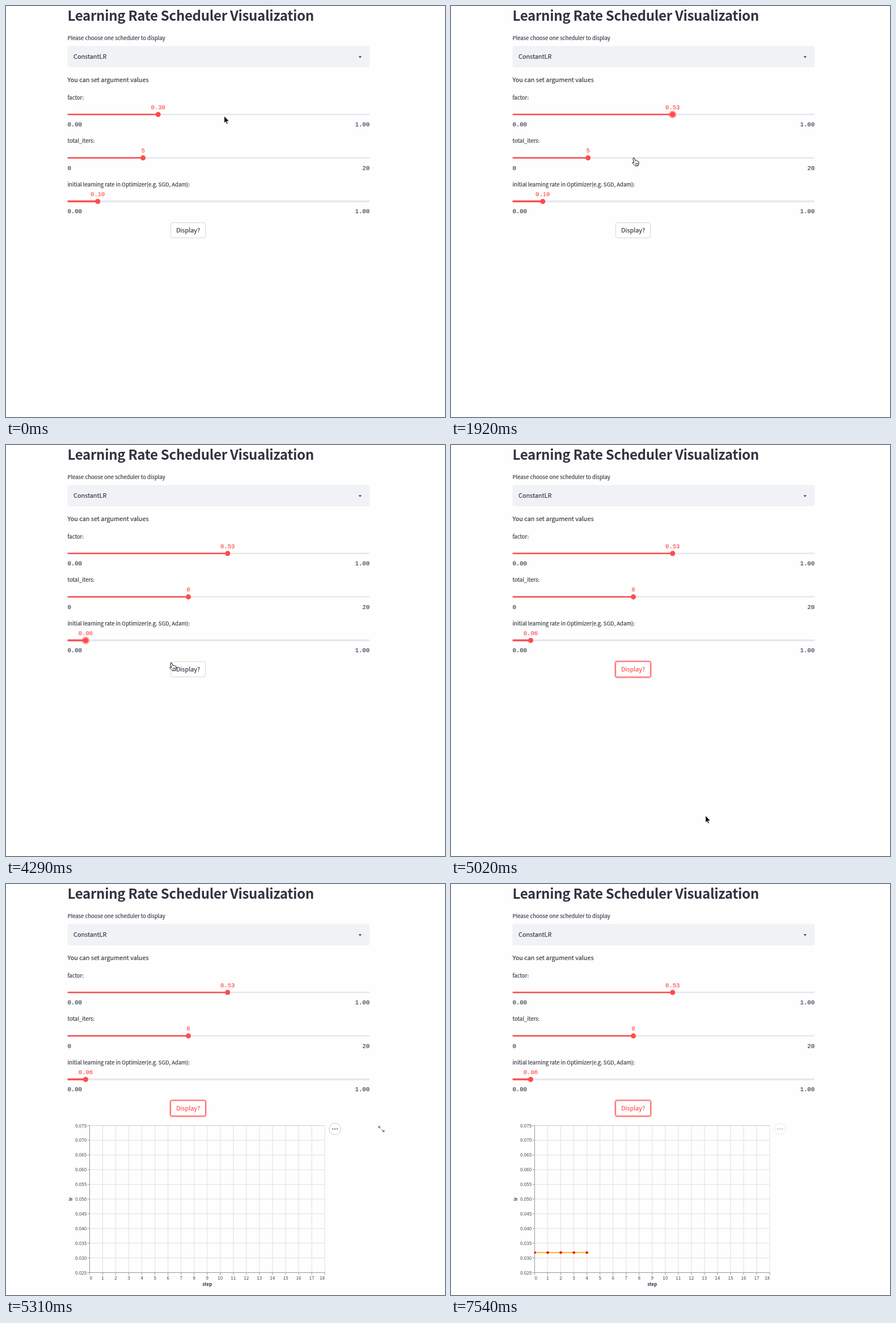
These frames come from a looping animation (774x724 px, 8000 ms). An HTML page:

```html
<!DOCTYPE html>
<html lang="en">
<head>
<meta charset="utf-8">
<title>Learning Rate Scheduler Visualization</title>
<style>
  html, body { margin: 0; width: 100%; height: 100%; overflow: hidden; background: #fefefe; }
  svg { display: block; }
  text { font-family: "Noto Sans CJK JP", "Noto Sans CJK SC", "Noto Sans CJK", "Noto Sans", sans-serif; fill: #31333f; }
  .title { font-size: 24px; font-weight: 700; letter-spacing: -.3px; }
  .label { font-size: 9.48px; }
  .body { font-size: 10.84px; }
  .label, .body { stroke: #31333f; stroke-width: .15px; }
  .mono { font-family: "Liberation Mono", monospace; font-size: 10.6px; stroke: #31333f; stroke-width: .15px; }
  .red { fill: #ff4b4b; }
  .mono.red { stroke: #ff4b4b; }
  .axis { font-size: 8.13px; fill: #44464f; }
  .bold { font-weight: 700; fill: #31333f; }
  .mid { text-anchor: middle; }
  .end { text-anchor: end; }
  #button rect { fill: #fff; stroke: #d6d6d9; }
  #button .ring { fill: none; stroke: none; }
  #button.hot rect { stroke: #ff4b4b; }
  #button.hot text { fill: #ff4b4b; stroke: #ff4b4b; }
  #button.hot .ring { stroke: none; }
  #button.focus .ring { stroke: #ff4b4b; stroke-opacity: .5; stroke-width: 2.2; }
  .cursor { stroke-linejoin: round; stroke-linecap: round; }
</style>
</head>
<body>
<svg id="stage" width="774" height="724" viewBox="0 0 774 724"></svg>
<script>
const LOOP = 8000;
const LEFT = 108.5, WIDTH = 532.5;
const PLOT = { x: 147.5, y: 425.5, w: 414.5, h: 259, steps: 18 };
const stepX = k => PLOT.x + k * PLOT.w / PLOT.steps;
const rateY = v => PLOT.y + PLOT.h * (0.075 - v) / 0.05;

// Each slider: centre line, bar height, range and [time, value] changes; halo lasts from-to.
const sliders = [
  { label: 'factor:', y: 191, bar: 2.5, max: 1, digits: 2, values: [[0, .3], [590, .53]], halo: [590, 2070] },
  { label: 'total_iters:', y: 267.6, bar: 2.5, max: 20, digits: 0, values: [[0, 5], [2070, 8]], halo: [2070, 3250] },
  { label: 'initial learning rate in Optimizer(e.g. SGD, Adam):', y: 344.2, bar: 3.2, max: 1, digits: 2,
    values: [[0, .1], [3250, .06]], halo: [3250, 4580] }
];

// time, x, y, cursor shape
const pointer = [
  [0, 384.6, 194, 'arrow'],
  [300, 388, 190, 'hand'], [450, 388, 189, 'hand'], [590, 388, 189, 'hand'], [740, 381, 196, 'hand'],
  [890, 345, 214, 'arrow'], [1040, 287, 237, 'arrow'], [1180, 230, 256, 'arrow'], [1330, 192, 265, 'hand'],
  [1480, 200, 268, 'hand'], [1630, 240, 269, 'hand'], [1770, 288, 268, 'hand'], [1920, 319, 267, 'hand'],
  [2070, 319, 267, 'hand'], [2210, 319, 268, 'hand'], [2360, 317, 273, 'hand'], [2500, 304, 278, 'hand'],
  [2650, 260, 298, 'arrow'], [2800, 197, 325, 'arrow'], [2950, 143, 332, 'palm'], [3100, 137, 340, 'hand'],
  [3250, 137, 343, 'hand'], [3400, 138, 344, 'hand'], [3550, 138, 344, 'hand'],
  [3990, 168, 353, 'arrow'], [4140, 238, 372, 'arrow'], [4290, 288, 383, 'hand'], [4430, 304, 387, 'hand'],
  [4580, 307, 388, 'hand'], [4730, 326, 400, 'hand'], [4880, 399, 545, 'arrow'], [5020, 448.6, 653, 'arrow'],
  [5170, 0, 0, 'none']
];

const BUTTON_HOVER = 4430, BUTTON_CLICK = 4580, CHART_SHOWN = 5170;
const menuFade = [[0, 1], [5460, .7], [5600, .4]];
const expandFade = [[0, 1], [5460, .5], [5600, 0]];
const pointTimes = [5750, 5900, 6500, 6940, 7540];
const pointRate = .06 * .53;

const text = (x, y, cls, str, extra = '') => `<text x="${x}" y="${y}" class="${cls}" ${extra}>${str}</text>`;
const line = (x1, y1, x2, y2, color) => `<path d="M${x1} ${y1}L${x2} ${y2}" stroke="${color}"/>`;
const range = n => [...Array(n).keys()];
const $ = id => document.getElementById(id);

function sliderMarkup(s, i) {
  const bar = (id, color) =>
    `<rect ${id} x="${LEFT}" y="${s.y - s.bar / 2}" width="${WIDTH}" height="${s.bar}" rx="1" fill="${color}"/>`;
  return text(LEFT, s.y - 26.3, 'label', s.label) + bar('', '#e6e6f1') + bar(`id="fill${i}"`, '#ff4b4b') +
    `<g id="thumb${i}"><circle id="halo${i}" r="6.8" cy="${s.y}" fill="#ff4b4b"/>
     <circle r="4.5" cy="${s.y}" class="red"/>${text(0, s.y - 9.2, 'mono red mid', '', `id="value${i}"`)}</g>` +
    text(LEFT, s.y + 21, 'mono', (0).toFixed(s.digits)) +
    text(LEFT + WIDTH, s.y + 21, 'mono end', s.max.toFixed(s.digits));
}

function chartMarkup() {
  const { x, y, w, h, steps } = PLOT, right = x + w, bottom = y + h;
  let out = '';
  for (const k of range(steps + 1)) {
    const anchor = k === 0 ? '' : k === steps ? 'end' : 'mid';
    out += line(stepX(k), y, stepX(k), bottom, '#e0e0e0') + line(stepX(k), bottom, stepX(k), bottom + 4, '#999') +
      text(stepX(k), 696.5, 'axis ' + anchor, k);
  }
  for (const k of range(11)) {
    const rate = .025 + k * .005, ry = rateY(rate);
    out += line(x, ry, right, ry, '#dedede') + line(x - 4, ry, x, ry, '#999') +
      text(142.3, ry + 3, 'axis end', rate.toFixed(3));
  }
  out += line(x, y, right, y, '#ccc') + line(x, y, x, bottom, '#999') + line(x, bottom, right, bottom, '#999');
  out += text(x + w / 2, 708, 'axis bold mid', 'step') +
    text(0, 0, 'axis bold mid', 'lr', 'transform="translate(117 555) rotate(-90)"');

  const py = rateY(pointRate);
  out += `<clipPath id="plotArea"><rect x="${x - .5}" y="${y}" width="${w + 1}" height="${h}"/></clipPath>
    <g clip-path="url(#plotArea)"><path id="series" fill="none" stroke="#fdb52a" stroke-width="2"/>` +
    pointTimes.map((_, k) => `<circle id="point${k}" cx="${stepX(k)}" cy="${py}" r="2.2" fill="#f00000"/>`).join('') + '</g>';

  out += '<g id="menu"><circle cx="580" cy="431.5" r="10.2" fill="#fff" stroke="#ccc"/>' +
    [-4, 0, 4].map(d => `<circle cx="${580 + d}" cy="431.5" r="1.35" fill="#888"/>`).join('') + '</g>';
  const corner = '<path d="M-5.6 -5.4H-1.4L-2.8 -4L-.7 -1.8L-1.8 -.7L-4 -2.8L-5.6 -1.2Z"/>';
  out += `<g id="expand" fill="#808087" transform="translate(661.7 431.6)">${corner}<g transform="rotate(180)">${corner}</g></g>`;
  return `<g id="chart">${out}</g>`;
}

const cursorMarkup = `
  <g id="arrow" class="cursor"><path d="M0 0V12.4L2.8 9.8L4.8 14.2L6.8 13.3L5 9H8.7Z" fill="#000" stroke="#fff" stroke-width="1"/></g>
  <g id="hand" class="cursor" fill="#fff" stroke="#000">
    <path d="M3.2 .7C4.6 .5 5 1.8 5.2 2.8L6 5.6C7 4.9 8 5.2 8.4 6C9.3 5.4 10.2 5.8 10.5 6.7C11.5 6.4 12 7.2 12 8.2V10.5C12 12 11 13 10.8 14.6H5.2C4.8 13.2 3 12 1.2 10.2C.2 9 1.2 8 2.4 8.4L3.6 9.4L1.9 2.6C1.7 1.5 2.3 .8 3.2 .7Z"/>
    <path d="M6.4 9.6V12.4M8.2 9.6V12.4M10 9.6V12.4" stroke-width=".7"/></g>
  <g id="palm" class="cursor" fill="#fff" stroke="#000">
    <path d="M4 8.4L2.6 4.4C2.2 2.8 3.8 2.2 4.5 3.6L5.3 5.6L5 2.2C5 .7 6.8 .6 7.1 2L7.5 5.2L7.9 1.8C8.2 .5 9.8 .8 9.8 2.2V5.6L10.7 3.5C11.3 2.3 12.7 2.8 12.4 4.3L12 9.5C11.8 11.5 10.8 12.5 10.6 14.5H5C4.6 12.8 2.2 11 1 8.8C.4 7.6 1.9 6.8 2.8 7.7Z"/>
    <path d="M5.3 5.6L5.8 7.5M7.5 5.2V7.3M9.8 5.6L9.5 7.5" stroke-width=".8"/></g>`;

$('stage').innerHTML =
  text(108.5, 26, 'title', 'Learning Rate Scheduler Visualization') +
  text(LEFT, 60, 'label', 'Please choose one scheduler to display') +
  `<rect x="${LEFT}" y="70.5" width="${WIDTH}" height="37.5" rx="3" fill="#f0f2f6"/>` +
  text(119, 93.3, 'body', 'ConstantLR') +
  '<path d="M621.6 88.6H627L624.3 91.4Z" fill="#31333f"/>' +
  text(LEFT, 133.6, 'body', 'You can set argument values') +
  sliders.map(sliderMarkup).join('') +
  `<g id="button"><rect class="ring" x="289.2" y="380.5" width="63.6" height="29.2" rx="3.6"/>
   <rect x="290.5" y="381.7" width="61" height="26.8" rx="2.6"/>${text(321, 399, 'body mid', 'Display?')}</g>` +
  chartMarkup() + cursorMarkup;

const latest = (table, t) => table.filter(row => row[0] <= t).pop();
const show = (id, on) => $(id).style.display = on ? '' : 'none';

function render(t) {
  sliders.forEach((s, i) => {
    const value = latest(s.values, t)[1], offset = WIDTH * value / s.max;
    $('fill' + i).setAttribute('width', offset);
    $('thumb' + i).setAttribute('transform', `translate(${LEFT + offset} 0)`);
    $('value' + i).textContent = value.toFixed(s.digits);
    show('halo' + i, t >= s.halo[0] && t < s.halo[1]);
    $('halo' + i).setAttribute('opacity', i === 2 && t < 3700 ? .3 : .5);
  });

  $('button').classList.toggle('hot', t >= BUTTON_HOVER);
  $('button').classList.toggle('focus', t >= BUTTON_CLICK);

  show('chart', t >= CHART_SHOWN);
  $('menu').setAttribute('opacity', latest(menuFade, t)[1]);
  $('expand').setAttribute('opacity', latest(expandFade, t)[1]);
  const count = pointTimes.filter(p => p <= t).length;
  pointTimes.forEach((_, k) => show('point' + k, k < count));
  $('series').setAttribute('d', count > 1 ? `M${PLOT.x} ${rateY(pointRate)}H${stepX(count - 1)}` : '');

  const [, x, y, shape] = latest(pointer, t);
  for (const id of ['arrow', 'hand', 'palm']) {
    show(id, id === shape);
    $(id).setAttribute('transform', `translate(${x} ${y})`);
  }
}

const start = performance.now();
function tick() {
  render((performance.now() - start) % LOOP);
  requestAnimationFrame(tick);
}
tick();
</script>
</body>
</html>
```
